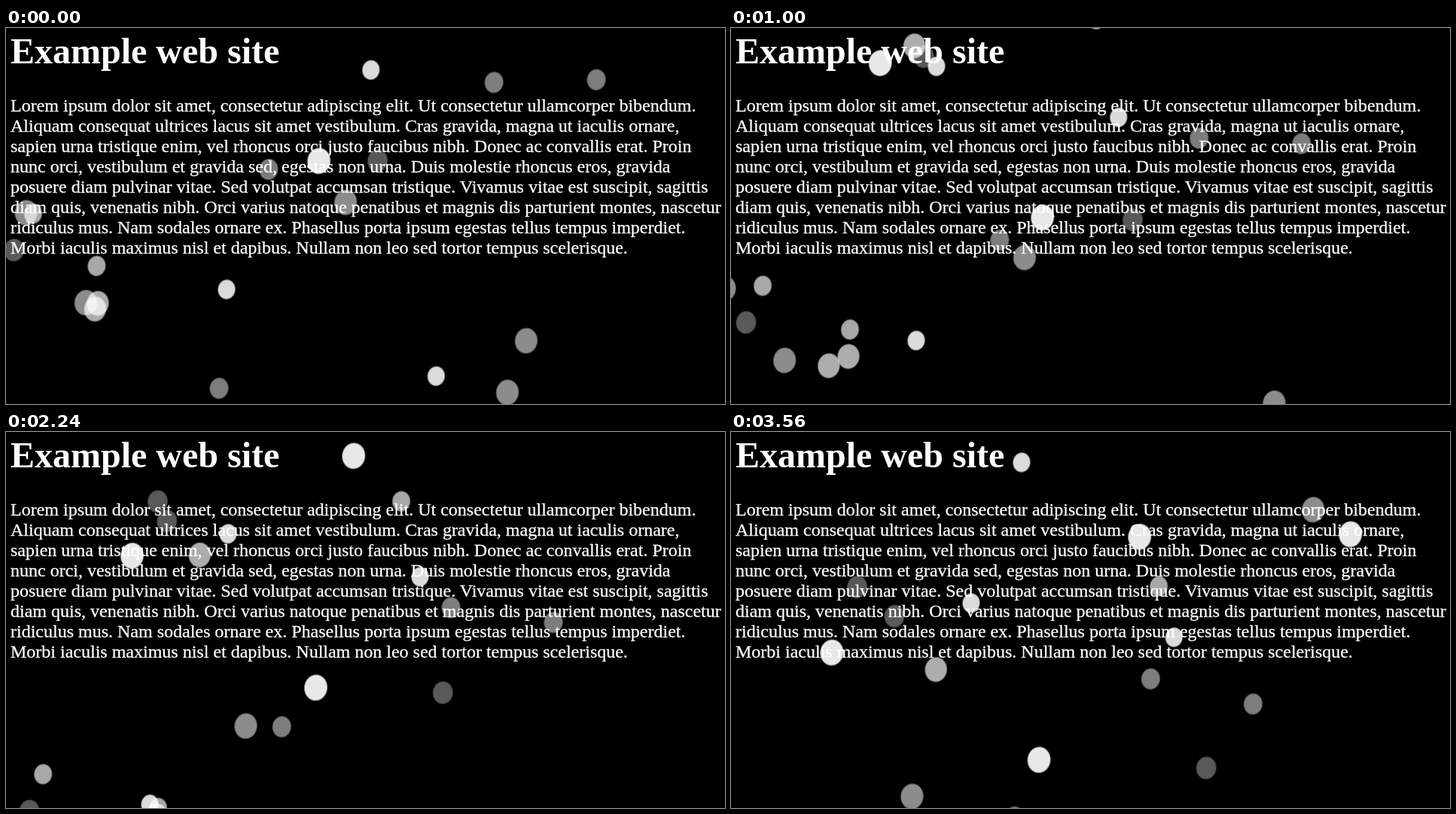
An HTML page with a canvas for the animation above (3.68 s loop, 955 by 500 pixels).

```html
<!DOCTYPE html>
<html lang="en">
<head>
<meta charset="utf-8">
<title>Snow</title>
<style>
  html, body { margin: 0; width: 100%; height: 100%; overflow: hidden; background: #000; }
  svg, canvas { position: absolute; left: 0; top: 0; width: 955px; height: 500px; }
  text { fill: #fff; font: 24px "Liberation Serif", serif; }
  .title { font-size: 48px; font-weight: bold; }
  .body { stroke: #fff; stroke-width: 0.3px; }
</style>
</head>
<body>
<svg viewBox="0 0 955 500">
  <text class="title" x="6" y="47">Example web site</text>
  <text class="body" y="84">
    <tspan x="6" dy="27">Lorem ipsum dolor sit amet, consectetur adipiscing elit. Ut consectetur ullamcorper bibendum.</tspan>
    <tspan x="6" dy="27">Aliquam consequat ultrices lacus sit amet vestibulum. Cras gravida, magna ut iaculis ornare,</tspan>
    <tspan x="6" dy="27">sapien urna tristique enim, vel rhoncus orci justo faucibus nibh. Donec ac convallis erat. Proin</tspan>
    <tspan x="6" dy="27">nunc orci, vestibulum et gravida sed, egestas non urna. Duis molestie rhoncus eros, gravida</tspan>
    <tspan x="6" dy="27">posuere diam pulvinar vitae. Sed volutpat accumsan tristique. Vivamus vitae est suscipit, sagittis</tspan>
    <tspan x="6" dy="27">diam quis, venenatis nibh. Orci varius natoque penatibus et magnis dis parturient montes, nascetur</tspan>
    <tspan x="6" dy="27">ridiculus mus. Nam sodales ornare ex. Phasellus porta ipsum egestas tellus tempus imperdiet.</tspan>
    <tspan x="6" dy="27">Morbi iaculis maximus nisl et dapibus. Nullam non leo sed tortor tempus scelerisque.</tspan>
  </text>
</svg>
<canvas id="snow" width="955" height="500"></canvas>
<script>
const ctx = document.getElementById('snow').getContext('2d');
const LOOP = 3680;
const STEP = 110;
const MIDWAY = 15.4; // progress at which each flake passes its key point

// Flakes of one kind run from the slowest to the fastest: [key x, key y, sideways drift].
const KINDS = [
  { radius: 11.4, alpha: 0.86, slow: 6.7, fast: 8.2, flakes: [
    [534, 159, 3.2], [519, 569, -3.4], [216, 459, -5], [285, 97, 2], [386, -99, 0]] },
  { radius: 15.2, alpha: 0.91, slow: 8, fast: 13, flakes: [
    [412.5, 300, -0.2], [428, -13, 6.75], [181.5, 111, -2.8], [816, -85, 0.4]] },
  { radius: 14.5, alpha: 0.68, slow: 6.7, fast: 12.7, flakes: [
    [180, 477, 4], [135, 502, 0.85], [251, 100, 1.25]] },
  { radius: 14.9, alpha: 0.55, slow: 7.8, fast: 11.9, flakes: [
    [351, 352, -6.5], [49, 491, -3.7], [741, 552, 3.25],
    [666, 634, 0], [-31, 411, -3.75], [831, -99, -3.4]] },
  { radius: 12.3, alpha: 0.49, slow: 7.9, fast: 10, flakes: [
    [605, 194, -2.8], [283, 607, 0], [741, 208, -2.8], [362, 342, 0.85]] },
  { radius: 13.2, alpha: 0.35, slow: 7.3, fast: 12.7, flakes: [
    [233, 82, -3.85], [559, 305, 4.25], [26, 453, 1], [195, 29, 1.3]] },
  { radius: 11.8, alpha: 0.66, slow: 9, fast: 10.2, flakes: [
    [182, 455, 4], [507, 45, 3.6], [46, 404, 0.65]] },
];

// Movement comes in even steps; the first one is a little longer.
function progressAt(time) {
  const step = Math.floor((time + 10) / STEP);
  return step ? step + 0.4 : 0;
}

function fallSpeed({ slow, fast, flakes }, index) {
  return slow + (fast - slow) * (index / (flakes.length - 1)) ** 1.5;
}

function softEdge(radius) {
  const fill = ctx.createRadialGradient(0, 0, radius - 1, 0, 0, radius + 1);
  fill.addColorStop(0, '#fff');
  fill.addColorStop(1, 'rgba(255,255,255,0)');
  return fill;
}

function drawFlake(x, y, radius, alpha) {
  ctx.save();
  ctx.translate(x, y);
  ctx.rotate(0.12);
  ctx.scale(1, 1.13);
  ctx.globalAlpha = alpha;
  ctx.fillStyle = softEdge(radius);
  ctx.beginPath();
  ctx.arc(0, 0, radius + 1, 0, Math.PI * 2);
  ctx.fill();
  ctx.restore();
}

function draw(time) {
  const travel = progressAt(time) - MIDWAY;
  ctx.clearRect(0, 0, 955, 500);
  for (const kind of KINDS) {
    kind.flakes.forEach(([x, y, drift], index) => {
      const fall = fallSpeed(kind, index);
      drawFlake(x + drift * travel, y + fall * travel, kind.radius, kind.alpha);
    });
  }
}

const start = performance.now();
function tick() {
  draw((performance.now() - start) % LOOP);
  requestAnimationFrame(tick);
}
tick();
</script>
</body>
</html>
```
